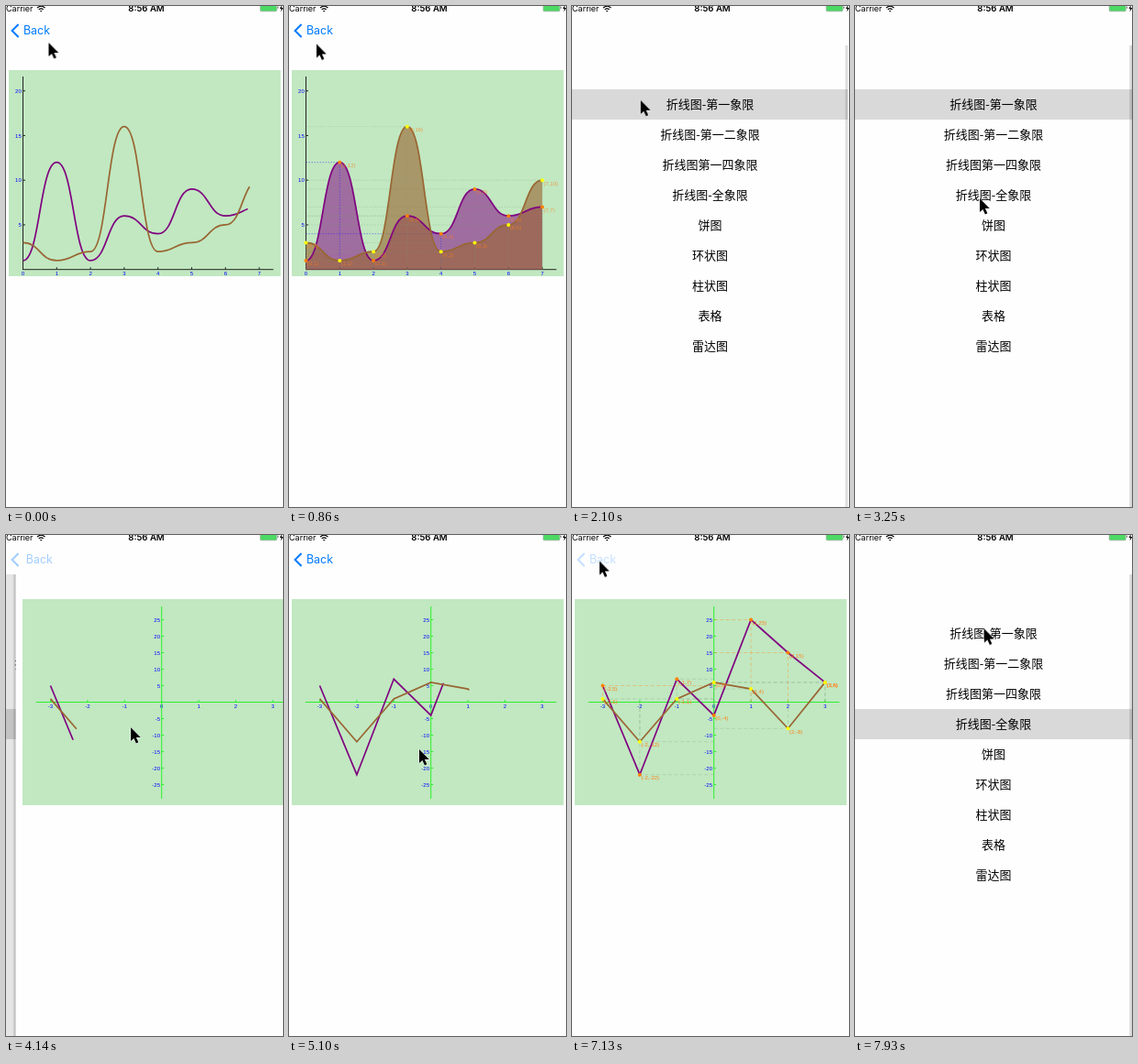
Recreate the animation shown at these times as an HTML page. Size 302x547 px, loop 8000 ms.

```html
<!DOCTYPE html>
<html lang="zh-CN">
<head>
<meta charset="utf-8">
<title>Line charts</title>
<style>
@property --q { syntax: "<number>"; inherits: true; initial-value: 0; }

html, body { margin: 0; width: 100%; height: 100%; overflow: hidden; background: #fefefe; }
svg { display: block; width: 302px; height: 547px; }

/* --q: how far the chart page has slid out, 0 = covering, 1 = gone */
#stage {
  --spring: linear(0, .079 5%, .237 10%, .404 15%, .552 20%, .764 30%, .884 40%, .945 50%, .9745 60%, .995 80%, 1);
  animation: slide 8s var(--spring) infinite;
}
@keyframes slide {
  0%, 21.075% { --q: 0; }
  27.325%, 48.225% { --q: 1; }
  54.475%, 92.825% { --q: 0; }
  99.075%, 100% { --q: 1; }
}
#list { transform: translateX(calc((var(--q) - 1) * 90.6px)); }
#dim { opacity: calc((1 - var(--q)) * .1); }
#page { transform: translateX(calc(var(--q) * 302px)); }
#charts { transform: translateX(min(4.5px, calc(var(--q) * 120px))); }
#label { transform: translateX(calc(var(--q) * 80px)); }

#selected { animation: select 8s step-end infinite; }
@keyframes select { 0% { transform: none; } 48.225%, 100% { transform: translateY(99px); } }

#first { animation: first 8s step-end infinite; }
#second { animation: second 8s step-end infinite; }
@keyframes first { 0% { opacity: 1; } 40%, 100% { opacity: 0; } }
@keyframes second { 0% { opacity: 0; } 40%, 100% { opacity: 1; } }

.line { fill: none; stroke-width: 1.7; stroke-dasharray: 1 2; }
#first .line { animation: draw1 8s linear infinite; }
#second .line { animation: draw2 8s linear infinite; }
@keyframes draw1 { 0% { stroke-dashoffset: .026; } .625%, 100% { stroke-dashoffset: 0; } }
@keyframes draw2 { 0%, 48.65% { stroke-dashoffset: 1; } 72.5%, 100% { stroke-dashoffset: 0; } }

#first .decor { animation: show1 8s linear infinite; }
#second .decor { animation: show2 8s linear infinite; }
@keyframes show1 { 0%, .8% { opacity: 0; } 3.2%, 100% { opacity: 1; } }
@keyframes show2 { 0%, 72.5% { opacity: 0; } 74.7%, 100% { opacity: 1; } }

#label { animation: label 8s linear infinite; }
#chevron { animation: chevron 8s linear infinite; }
@keyframes label {
  0%, 19.7% { opacity: 1; }
  19.72%, 21.05% { opacity: .23; }
  21.1% { opacity: .65; }
  24%, 50.7% { opacity: 0; }
  53.6%, 89.05% { opacity: 1; }
  89.1%, 92.8% { opacity: .23; }
  92.85% { opacity: .65; }
  95.7%, 100% { opacity: 0; }
}
@keyframes chevron {
  0%, 19.7% { opacity: 1; }
  19.72%, 21.05% { opacity: .23; }
  24%, 50.7% { opacity: 0; }
  53.6%, 89.05% { opacity: 1; }
  89.1%, 92.8% { opacity: .23; }
  95.7%, 100% { opacity: 0; }
}

#cursor { animation: cursor 8s linear infinite; }
@keyframes cursor {
  0% { transform: translate(46.5px, 40px); }
  2.1% { transform: translate(45px, 44px); }
  3.25% { transform: translate(43px, 50px); }
  5.4% { transform: translate(42px, 59px); }
  6.5% { transform: translate(40px, 61px); }
  8.75% { transform: translate(34px, 50px); }
  13%, 21.9% { transform: translate(25.5px, 32px); animation-timing-function: ease-in-out; }
  31.75% { transform: translate(148px, 208px); }
  32.9%, 36.2% { transform: translate(149px, 212px); }
  40.6%, 58.3% { transform: translate(136px, 210px); }
  63.75%, 69% { transform: translate(142px, 234px); }
  74.75%, 76% { transform: translate(147px, 226px); animation-timing-function: ease-in-out; }
  87%, 92.7% { transform: translate(30px, 28.5px); animation-timing-function: ease-in-out; }
  98.9%, 100% { transform: translate(141px, 102.5px); }
}

#list text { font: 13px "Noto Sans CJK SC", "Noto Sans CJK", sans-serif; text-anchor: middle; }
#charts text { font: 6px "Liberation Sans", sans-serif; }
.tick { fill: #00f; }
.note { fill: #ff7f1a; }
.ui { font-family: Inter, sans-serif; }
</style>
</head>
<body>
<svg id="stage" viewBox="0 0 302 547">
  <defs>
    <linearGradient id="shade">
      <stop offset="0" stop-color="#000" stop-opacity=".08"/>
      <stop offset="1" stop-color="#000" stop-opacity=".18"/>
    </linearGradient>
  </defs>
  <rect width="302" height="547" fill="#fefefe"/>

  <g id="list">
    <rect id="selected" y="91" width="302" height="33" fill="#d9d9d9"/>
  </g>
  <rect id="dim" y="43" width="302" height="504"/>

  <g id="page">
    <rect x="-3" y="43" width="3" height="504" fill="url(#shade)"/>
    <rect y="43" width="302" height="504" fill="#fefefe"/>
    <g id="charts"></g>
  </g>

  <rect width="302" height="43" fill="#fefefe"/>
  <path id="chevron" d="M13.6 20 6.6 27l7 7" fill="none" stroke="#007aff" stroke-width="2"/>
  <text id="label" class="ui" x="19" y="31.3" font-size="12.4" fill="#007aff">Back</text>

  <g class="ui">
    <text x="0" y="6" font-size="9">Carrier</text>
    <path d="M34 2q4.2-3.6 8.5 0M35.7 3.9q2.5-2 5 0" fill="none" stroke="#000" stroke-width="1.2"/>
    <path d="M36.9 5l1.3 1.5L39.5 5z"/>
    <text x="153" y="6.2" font-size="9.6" font-weight="600" text-anchor="middle">8:56 AM</text>
    <rect x="277.2" y="-3" width="18" height="8.8" rx="1.2" fill="#4cd964" stroke="#9a9a9a" stroke-width=".6"/>
    <path d="M296.3 0v3.4q1.4-1.7 0-3.4"/>
    <path d="M300.6-1 298.5 3h1.8l-.8 3.5L302.4 2h-1.8z"/>
  </g>

  <path id="cursor" d="M0 0V15L3.4 11.9 5.9 17.4 8.4 16.3 5.9 11H10.8Z" stroke="#fff" stroke-width="1" paint-order="stroke"/>
</svg>

<script>
const PURPLE = '#800080', BROWN = '#996633';

function add(parent, tag, attrs = {}, text = '') {
  const el = document.createElementNS('http://www.w3.org/2000/svg', tag);
  for (const key in attrs) el.setAttribute(key, attrs[key]);
  el.textContent = text;
  return parent.appendChild(el);
}

const list = document.getElementById('list');
['折线图-第一象限', '折线图-第一二象限', '折线图第一四象限', '折线图-全象限',
 '饼图', '环状图', '柱状图', '表格', '雷达图'].forEach((name, i) =>
  add(list, 'text', { x: 151, y: 112.4 + 33 * i }, name));

function trace(points, smooth) {
  return points.map(([x, y], i) => {
    if (!i) return `M${x} ${y}`;
    if (!smooth) return `L${x} ${y}`;
    const [px, py] = points[i - 1], mid = (px + x) / 2;
    return `C${mid} ${py} ${mid} ${y} ${x} ${y}`;
  }).join('');
}

function chart(id, c) {
  const X = v => c.x0 + c.ux * v, Y = v => c.y0 - c.uy * v;
  const root = add(document.getElementById('charts'), 'g', { id });
  add(root, 'rect', { x: 3, y: 70, width: 296.5, height: 225, fill: '#c1e8c1' });

  let axes = `M${c.x0} ${c.top}V288M18 ${c.y0}H291.5`;
  for (let v = c.minX; v <= c.maxX; v++) {
    axes += `M${X(v)} ${c.y0}v-2.5`;
    add(root, 'text', { class: 'tick', x: X(v), y: c.y0 + 6.4, 'text-anchor': 'middle' }, v);
  }
  for (let v = c.minY; v <= c.maxY; v += 5) {
    if (!v) continue;
    axes += `M${c.x0} ${Y(v)}h2.5`;
    add(root, 'text', { class: 'tick', x: c.x0 - 1.7, y: Y(v) + 2.2, 'text-anchor': 'end' }, v);
  }
  add(root, 'path', { d: axes, stroke: c.axis, 'stroke-width': 1, fill: 'none' });

  const under = add(root, 'g', { class: 'decor' });
  const lines = add(root, 'g');
  const over = add(root, 'g', { class: 'decor' });

  c.series.forEach(s => {
    const points = s.values.map((v, i) => [X(c.minX + i), Y(v)]);
    const d = trace(points, c.smooth);
    if (c.smooth) {
      add(under, 'path', { d: `${d}V${c.y0}H${c.x0}Z`, fill: s.color, opacity: s.alpha });
    }
    add(lines, 'path', { class: 'line', d, stroke: s.color, pathLength: 1 });

    points.forEach(([x, y], i) => {
      const strong = s.strong.includes(i);
      add(under, 'path', {
        d: `M${c.x0} ${y}H${x}M${x} ${c.y0}V${y}`, fill: 'none',
        stroke: strong ? c.guide : '#7d9a7d', opacity: strong ? .65 : .4,
        'stroke-width': .7, 'stroke-dasharray': c.dash
      });
    });
    points.forEach(([x, y], i) => {
      add(over, 'text', { class: 'note', x: x + 1.5, y: y + 5.3, opacity: c.smooth ? .7 : 1 },
        `(${c.minX + i},${s.values[i]})`);
      add(over, 'circle', { cx: x, cy: y, r: 2, fill: s.dot });
    });
  });
}

chart('first', {
  x0: 18.5, y0: 287.7, ux: 36.8, uy: 9.75, top: 77,
  minX: 0, maxX: 7, minY: 0, maxY: 20,
  axis: '#222', guide: '#22f', dash: '1.5 1.5', smooth: true,
  series: [
    { values: [1, 12, 1, 6, 4, 9, 6, 7], color: PURPLE, dot: '#ff8000', alpha: .53, strong: [1, 4] },
    { values: [3, 1, 2, 16, 2, 3, 5, 10], color: BROWN, dot: '#ffff00', alpha: .62, strong: [] }
  ]
});

chart('second', {
  x0: 154.7, y0: 182.5, ux: 40.4, uy: 3.6, top: 78,
  minX: -3, maxX: 3, minY: -25, maxY: 25,
  axis: '#2bf02b', guide: '#ff9a2e', dash: '4 2.5', smooth: false,
  series: [
    { values: [5, -22, 7, -4, 25, 15, 6], color: PURPLE, dot: '#ff8000', strong: [0, 4, 5] },
    { values: [1, -12, 1, 6, 4, -8, 6], color: BROWN, dot: '#ffff00', strong: [] }
  ]
});
</script>
</body>
</html>
```
